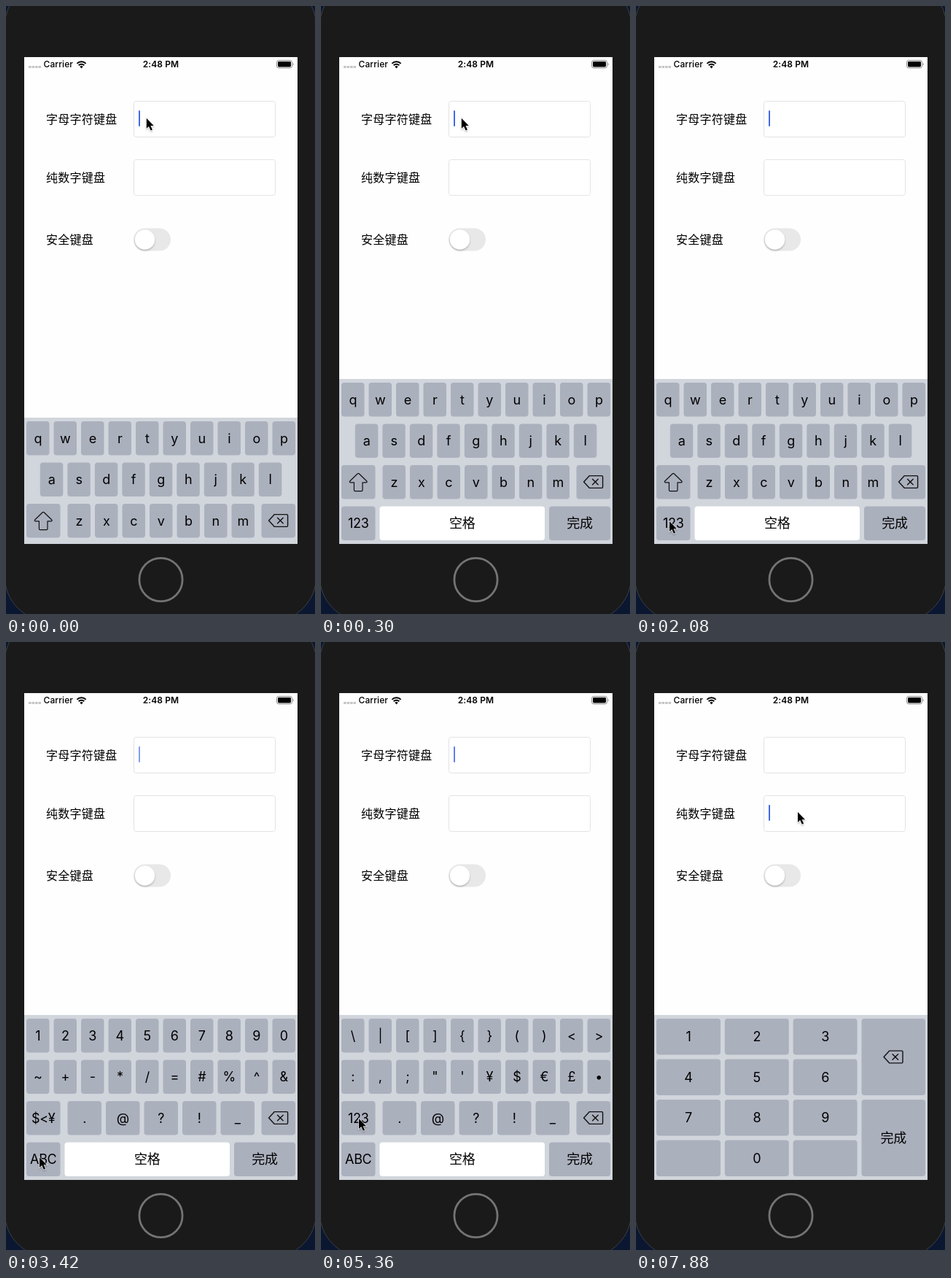
An HTML page for the animation above (8 s loop, 424 by 833 pixels).

```html
<!DOCTYPE html>
<html lang="zh-CN">
<head>
<meta charset="utf-8">
<title>Keyboard demo</title>
<style>
  html, body { margin: 0; width: 100%; height: 100%; overflow: hidden; background: #0b1730; }
  svg { display: block; width: 424px; height: 833px; }
  text { font-family: Inter, "Noto Sans CJK SC", "Noto Sans CJK", sans-serif; fill: #000; }
  .label { font-size: 16px; letter-spacing: .25px; }
  .status { font-size: 12px; font-weight: 500; letter-spacing: .1px; }
  .time { font-weight: 600; text-anchor: middle; }
  .key { font-size: 18px; letter-spacing: -.3px; text-anchor: middle; }
  .line { fill: none; stroke: #111; stroke-width: 1.4; stroke-linejoin: round; stroke-linecap: round; }
</style>
</head>
<body>
<svg id="stage" viewBox="0 0 424 833" xmlns="http://www.w3.org/2000/svg">
  <defs>
    <clipPath id="screen"><rect x="25" y="70" width="375" height="667"/></clipPath>
    <filter id="soft" x="-50%" y="-50%" width="200%" height="200%">
      <feDropShadow dx="0" dy="1.5" stdDeviation="1.2" flood-opacity=".28"/>
    </filter>
  </defs>

  <rect width="424" height="833" fill="#0b1730"/>
  <rect x="-2" y="-34" width="428" height="877" rx="62" fill="#1a1a1a" stroke="#3c4046"/>
  <circle cx="212.5" cy="786" r="29.6" fill="none" stroke="#747474" stroke-width="2.8"/>
  <rect x="25" y="70" width="375" height="667" fill="#fefefe"/>

  <path d="M31 83.5h17" stroke="#c6c6c6" stroke-width="3" stroke-dasharray="3.6 .9"/>
  <text class="status" x="51.5" y="84.2">Carrier</text>
  <g fill="none" stroke="#000" stroke-width="2">
    <path d="M97.4 78.9a8.6 8.6 0 0 1 12.2 0"/>
    <path d="M99.7 81.3a5.4 5.4 0 0 1 7.6 0"/>
  </g>
  <path d="M103.5 85.4l-2.2-2.3a3.1 3.1 0 0 1 4.4 0z"/>
  <text class="status time" x="212.5" y="84.2">2:48 PM</text>
  <rect x="371.5" y="74.5" width="21" height="10.4" rx="2.7" fill="none" stroke="#8a8a8a"/>
  <rect x="373" y="76" width="18" height="7.4" rx="1.4"/>
  <path d="M393.8 78v3.6a2 2 0 0 0 0-3.6z" fill="#8a8a8a"/>

  <text class="label" x="55" y="160.6">字母字符键盘</text>
  <text class="label" x="55" y="240.6">纯数字键盘</text>
  <text class="label" x="55" y="325.6">安全键盘</text>
  <g fill="#fff" stroke="#e3e3e5">
    <rect x="175.5" y="130.5" width="194" height="49" rx="3"/>
    <rect x="175.5" y="210.5" width="194" height="49" rx="3"/>
  </g>
  <rect x="175" y="304.5" width="51" height="31" rx="15.5" fill="#e8e8e9"/>
  <circle cx="190.5" cy="320" r="13.6" fill="#fff" filter="url(#soft)"/>
  <rect id="caret" x="182" width="2" height="22" rx="1" fill="#4169e8"/>

  <g clip-path="url(#screen)"><g id="board">
    <rect x="25" y="511" width="375" height="280" fill="#d1d5dc"/>
  </g></g>

  <g id="cursor" filter="url(#soft)">
    <path d="M0 0V14L3.2 11.1L5.8 16.8L8.1 15.8L5.6 10.2H10Z" stroke="#fff" stroke-width="1.1" paint-order="stroke"/>
  </g>
</svg>
<script>
const NS = 'http://www.w3.org/2000/svg';
const LOOP = 8000, TICK = 148.3;
const $ = id => document.getElementById(id);
const board = $('board'), caret = $('caret'), cursor = $('cursor');

function add(parent, tag, attrs, text) {
  const el = document.createElementNS(NS, tag);
  for (const k in attrs) el.setAttribute(k, attrs[k]);
  if (text) el.textContent = text;
  return parent.appendChild(el);
}

// Letter and symbol rows
const rowY = r => 516 + r * 56.5;
function key(g, x, y, w, h, text, fill = '#abb0bd') {
  add(g, 'rect', { x, y, width: w, height: h, rx: 4, fill });
  if (text) add(g, 'text', { class: 'key', x: x + w / 2, y: y + h / 2 + 6.7 }, text);
}
function keys(g, row, x, step, w, chars) {
  [...chars].forEach((c, i) => key(g, x + i * step, rowY(row), w, 46.5, c));
}
function eraser(g, x, y) {
  add(g, 'path', {
    class: 'line', transform: `translate(${x} ${y})`,
    d: 'M-13 0L-5.2 -8.4H11.7Q13 -8.4 13 -7V7Q13 8.4 11.7 8.4H-5.2ZM-1 -3.8L6.6 3.8M6.6 -3.8L-1 3.8'
  });
}
function panel(rows, mode, left) {
  const g = add(board, 'g', {});
  keys(g, 0, 28, 37.5, 31.5, rows[0]);
  keys(g, 1, rows[1].length < 10 ? 46.8 : 28, 37.5, 31.5, rows[1]);
  const wide = rows[2].length < 6;
  keys(g, 2, 84.5, wide ? 52.5 : 37.5, wide ? 46.5 : 31.5, rows[2]);
  key(g, 28, rowY(2), 46.5, 46.5, left);
  if (!left) add(g, 'path', {
    class: 'line', style: 'stroke-width:1.2',
    d: 'M50.2 640.8Q51.2 640 52.2 640.8L62.8 651Q63.8 652.6 62 652.8H57V663.2Q57 664.6 55.6 664.6H46.8Q45.4 664.6 45.4 663.2V652.8H40.4Q38.6 652.6 39.6 651Z'
  });
  key(g, 350.5, rowY(2), 46.5, 46.5);
  eraser(g, 373.6, 652);
  key(g, 28, rowY(3), 46.5, 46.5, mode);
  key(g, 80.5, rowY(3), 226.5, 46.5, '空格', '#fff');
  key(g, 313, rowY(3), 84, 46.5, '完成');
  return g;
}
function numPad() {
  const g = add(board, 'g', {});
  ['1', '2', '3', '4', '5', '6', '7', '8', '9', '', '0', ''].forEach((c, i) =>
    key(g, 28 + (i % 3) * 93.8, 516 + Math.floor(i / 3) * 55.5, 88, 49.5, c));
  key(g, 309.5, 516, 87.5, 105);
  eraser(g, 353, 568.5);
  key(g, 309.5, 627, 87.5, 105, '完成');
  return g;
}

const panels = [
  panel(['qwertyuiop', 'asdfghjkl', 'zxcvbnm'], '123'),
  panel(['1234567890', '~+-*/=#%^&', '.@?!_'], 'ABC', '$<¥'),
  panel(['\\|[]{}()<>', ':,;"\'¥$€£•', '.@?!_'], 'ABC', '123'),
  numPad()
];

// Step tables: [tick, value]
const shown = [[0, 0], [18, 1], [31, 2], [45, 3]];
const slide = [[0, 53], [1, 6], [2, 0]];
const blink = [
  [0, 1], [3, .6], [4, 0], [6, .5], [7, 1], [10, .6], [11, 0], [13, .5], [14, 1],
  [16, .6], [17, 0], [20, 1], [23, .65], [24, 0], [26, .5], [27, 1], [30, .6], [31, 0],
  [33, .5], [34, 1], [36, .85], [37, 0], [39, .5], [40, 1], [43, .5], [44, 0],
  [45, 1], [49, .6], [50, 0], [52, .5], [53, 1]
];
const held = (table, n) => table.reduce((v, s) => s[0] <= n ? s[1] : v, 0);

// Pointer moves: start tick, end tick, from, to, easing of x and y
const out = p => 1 - (1 - p) ** 3;
const inOut = p => p * p * (3 - 2 * p);
const moves = [
  [6, 13, [192.8, 153.8], [46, 706], p => p ** .9, out],
  [23, 27, [46, 706], [52, 653], inOut, inOut],
  [36, 41, [52, 653], [222, 233], inOut, inOut]
];
function pointer(n) {
  const [a, b, from, to, ex, ey] = moves.filter(m => m[0] <= n).pop() || moves[0];
  const p = Math.min(1, Math.max(0, (n - a) / (b - a)));
  return [from[0] + (to[0] - from[0]) * ex(p), from[1] + (to[1] - from[1]) * ey(p)];
}

function draw(t) {
  const n = Math.floor(t / TICK);
  const current = held(shown, n);
  panels.forEach((g, i) => g.setAttribute('display', i === current ? 'inline' : 'none'));
  board.setAttribute('transform', `translate(0 ${held(slide, n)})`);
  caret.setAttribute('y', current === 3 ? 223 : 143);
  caret.setAttribute('opacity', held(blink, n));
  cursor.setAttribute('transform', `translate(${pointer(n).join(' ')})`);
}

const start = performance.now();
function loop() {
  draw((performance.now() - start) % LOOP);
  requestAnimationFrame(loop);
}
draw(0);
requestAnimationFrame(loop);
</script>
</body>
</html>
```
